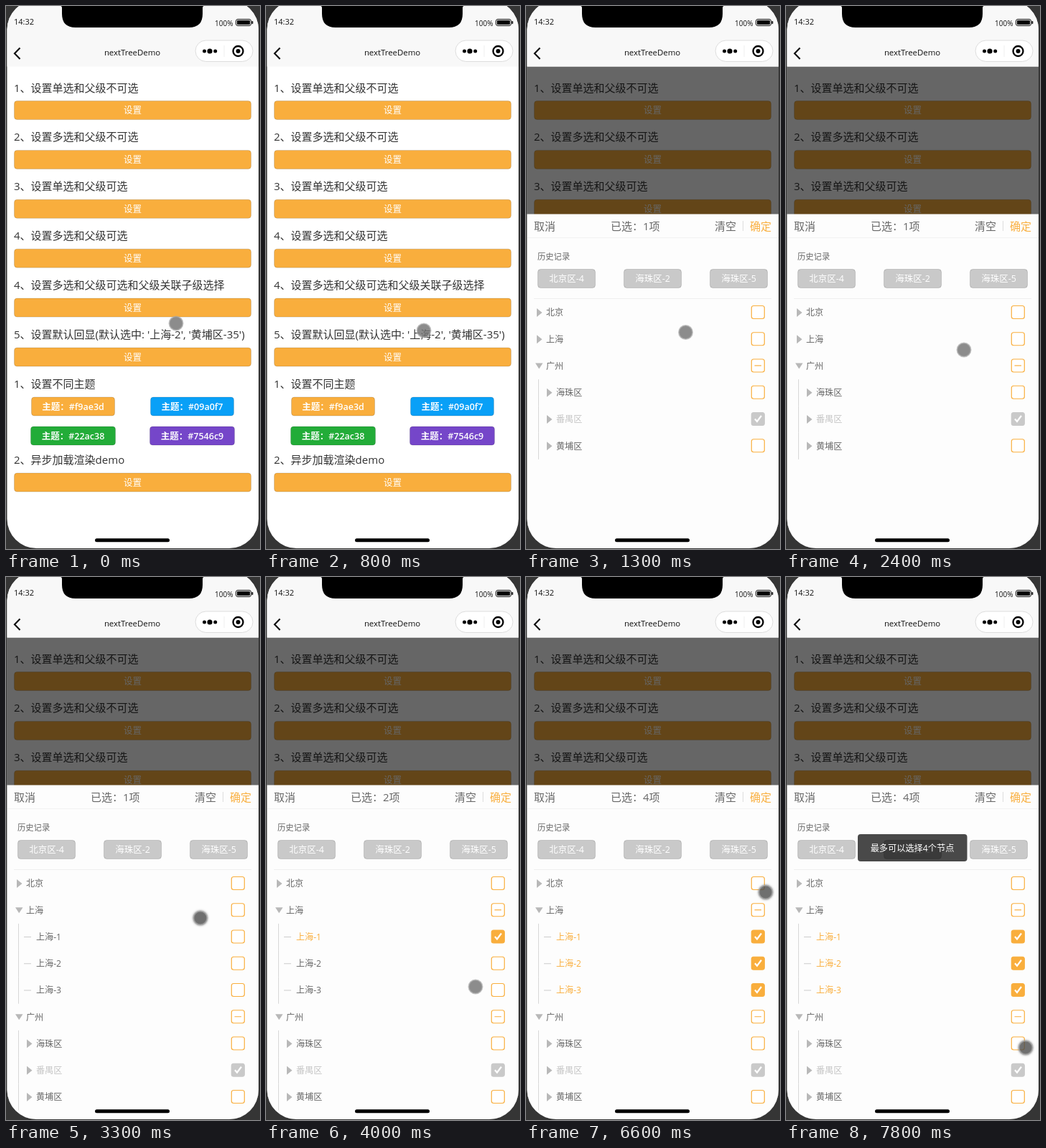
These frames come from a looping animation (354 px wide and 758 px high, 8000 ms). An HTML page:

```html
<!DOCTYPE html>
<html lang="zh-CN">
<head>
<meta charset="utf-8">
<style>
html, body { margin: 0; width: 100%; height: 100%; overflow: hidden; background: #353535; }
svg { display: block; font-family: "Open Sans", "Noto Sans CJK SC", "Noto Sans CJK", sans-serif; }
</style>
</head>
<body>
<svg id="stage" width="354" height="758" viewBox="0 0 354 758">
  <clipPath id="screen"><rect x="1.5" y="-8" width="350.5" height="765" rx="41"/></clipPath>
  <filter id="soft" x="-50%" y="-50%" width="200%" height="200%"><feGaussianBlur stdDeviation="1.6"/></filter>
  <g clip-path="url(#screen)">
    <rect width="354" height="758" fill="#fff"/>
    <g id="page"></g>
    <rect id="mask" y="84.5" width="354" height="674"/>
    <rect width="354" height="84.5" fill="#f8f8f8"/>
    <g id="popup">
      <rect y="290.5" width="354" height="468" fill="#fdfdfd"/>
      <g id="head"></g>
      <g id="tree"></g>
    </g>
    <g id="bar"></g>
  </g>
  <path d="M76 0H276Q274 0 274 3V11Q274 30 255 30H97Q78 30 78 11V3Q78 0 76 0Z"/>
  <rect x="124" y="743.3" width="104" height="5" rx="2.5"/>
  <g id="toast"></g>
  <g id="cursor">
    <circle id="halo" r="10.5" fill="#555" fill-opacity=".6" filter="url(#soft)"/>
    <circle id="disc" r="9.5" stroke="#aaa" stroke-opacity=".65" stroke-width="2"/>
  </g>
</svg>
<script>
const LOOP = 8000, STEP = 100, ORANGE = '#f9ae3d', GREY = '#c9c9c9', INK = '#666';
const el = id => document.getElementById(id);

// y is the vertical middle of the text
const text = (s, x, y, size, fill, anchor = 'start', weight = 400) =>
  `<text x="${x}" y="${y + size * .37}" font-size="${size}" fill="${fill}" text-anchor="${anchor}" font-weight="${weight}">${s}</text>`;
const line = (d, color, width = 1) =>
  `<path d="${d}" fill="none" stroke="${color}" stroke-width="${width}"/>`;
const button = (s, x, y, w, fill, weight = 400) =>
  `<rect x="${x + .5}" y="${y - 13}" width="${w - 1}" height="26" rx="4" fill="${fill}" stroke="#000" stroke-opacity=".14"/>` +
  text(s, x + w / 2, y, 12.5, '#fff', 'middle', weight);

const sections = ['1、设置单选和父级不可选', '2、设置多选和父级不可选', '3、设置单选和父级可选', '4、设置多选和父级可选',
  '4、设置多选和父级可选和父级关联子级选择', "5、设置默认回显(默认选中: '上海-2', '黄埔区-35')"];
const section = (s, y) => text(s, 11, y, 15, '#333') + button('设置', 11, y + 31.5, 331, ORANGE);

el('page').innerHTML = sections.map((s, i) => section(s, 114 + 68.9 * i)).join('') +
  text('1、设置不同主题', 11, 527.5, 15, '#333') +
  [[35, 559, 117, ORANGE], [201, 559, 117, '#09a0f7'], [34, 600, 119, '#22ac38'], [200, 600, 119, '#7546c9']]
    .map(([x, y, w, c]) => button('主题：' + c, x, y, w, c, 600)).join('') +
  section('2、异步加载渲染demo', 633.5);

el('bar').innerHTML = text('14:32', 11, 22, 11, '#111') + text('100%', 291, 24, 10, '#111') +
  '<rect x="320.5" y="18.5" width="21" height="9" rx="2.5" fill="none" stroke="#111"/>' +
  '<rect x="322" y="20" width="18" height="6" rx="1"/><rect x="342.5" y="21" width="1.8" height="4" rx=".8"/>' +
  line('M19.5 58.6L12 66.3L19.5 74', '#111', 2.2) +
  text('nextTreeDemo', 176, 65, 11.4, '#111', 'middle') +
  '<rect x="264" y="48" width="80" height="29.5" rx="14.7" fill="#fff" stroke="#ddd"/>' +
  line('M304 55V71', '#eee') +
  '<circle cx="276.5" cy="63" r="2.5"/><circle cx="284" cy="63" r="3.6"/><circle cx="291.7" cy="63" r="2.5"/>' +
  '<circle cx="323.5" cy="63" r="7" fill="none" stroke="#000" stroke-width="2.3"/><circle cx="323.5" cy="63" r="3"/>';

el('toast').innerHTML = '<rect x="100" y="359" width="152.5" height="38" rx="4" fill-opacity=".71"/>' +
  text('最多可以选择4个节点', 176, 378, 12.2, '#fff', 'middle');

const drawHead = count => text('取消', 11, 307.5, 15, INK) + text(`已选：${count}项`, 118, 307.5, 15, INK) +
  text('清空', 263, 307.5, 15, INK) + line('M302.5 300V314', '#ddd') + text('确定', 312, 307.5, 15, ORANGE, 'start', 500) +
  line('M2 323.5H352', '#f2f2f2') + text('历史记录', 16, 349.7, 11.3, INK) +
  ['北京区-4', '海珠区-2', '海珠区-5'].map((s, i) => button(s, 16 + 120 * i, 380.5, 81, GREY, 500)).join('') +
  line('M11 408.5H342', '#eee');

function checkbox(y, mark) {
  const full = mark === 'on' || mark === 'locked', color = mark === 'locked' ? GREY : ORANGE;
  return `<rect x="314.3" y="${y - 9}" width="18" height="18" rx="3" fill="${full ? color : '#fff'}" stroke="${color}" stroke-width="1.2"/>` +
    (full ? line(`M319 ${y}L322 ${y + 3.5}L328 ${y - 4.5}`, '#fff', 2.2) : '') +
    (mark === 'part' ? line(`M318.5 ${y}H328`, color, 1.2) : '');
}

function row({ name, depth = 0, icon = 'closed', mark }, i) {
  const y = 428 + 37.25 * i, x = 14 * depth;
  const color = { on: ORANGE, locked: '#c4c4c4' }[mark] || INK;
  const icons = {
    closed: `<path d="M${x + 15} ${y - 6}L${x + 22.5} ${y}L${x + 15} ${y + 6}Z" fill="#b8b8b8"/>`,
    open: `<path d="M13 ${y - 4}H23.5L18.2 ${y + 4}Z" fill="#b8b8b8"/>`,
    leaf: line(`M25 ${y}H35`, '#ccc')
  };
  return icons[icon] + text(name, 28 + x, y, 12.1, color) + checkbox(y - .5, mark) +
    (depth ? line(`M17.5 ${y - 18.6}V${y + 18.7}`, '#d8d8d8') : '');
}

const drawTree = (open, picked) => [
  { name: '北京' },
  { name: '上海', icon: open ? 'open' : 'closed', mark: picked && 'part' },
  ...(open ? [1, 2, 3].map(n => ({ name: '上海-' + n, depth: 1, icon: 'leaf', mark: n <= picked && 'on' })) : []),
  { name: '广州', icon: 'open', mark: 'part' },
  { name: '海珠区', depth: 1 },
  { name: '番禺区', depth: 1, mark: 'locked' },
  { name: '黄埔区', depth: 1 }
].map(row).join('');

const path = [[0, 237, 443], [450, 232, 437], [800, 220, 453], [1200, 220, 453], [1800, 235, 468], [2400, 248, 480],
  [2700, 264, 476], [3400, 272, 476], [3700, 312, 510], [3800, 312, 512], [4000, 292, 572], [4150, 294, 570],
  [4350, 313, 548], [4450, 313, 550], [4700, 314, 580], [5000, 314, 575], [5200, 311, 472], [5400, 311, 472],
  [6000, 333, 452], [6500, 334, 440], [6650, 334, 440], [6900, 336, 449], [7100, 336, 449], [7700, 334, 657], [8000, 334, 657]];
const presses = [[1000, 1200], [3300, 3400], [3700, 3800], [4300, 4400], [4700, 4800], [5400, 5500], [6500, 6700], [7700, 8000]];
const picks = [3800, 4400, 4800], toasts = [[5400, 6500], [6800, 8000]];
const within = (spans, t) => spans.some(([a, b]) => t >= a && t < b);

function cursorAt(t) {
  const i = path.findIndex(p => p[0] > t), [t0, x0, y0] = path[i - 1], [t1, x1, y1] = path[i];
  const k = (t - t0) / (t1 - t0);
  return [x0 + (x1 - x0) * k, y0 + (y1 - y0) * k];
}

let drawn = '';
function frame(now) {
  const t = Math.floor(now % LOOP / STEP) * STEP;
  const left = 1 - Math.min(1, Math.max(0, (t - 1000) / 285)), shown = 1 - left * left;
  el('mask').setAttribute('opacity', .6 * shown);
  el('popup').setAttribute('transform', `translate(0 ${467.5 * (1 - shown)})`);

  const open = t >= 3300, picked = picks.filter(p => t >= p).length, key = open + '-' + picked;
  if (key !== drawn) {
    el('head').innerHTML = drawHead(1 + picked);
    el('tree').innerHTML = drawTree(open, picked);
    drawn = key;
  }
  el('toast').style.display = within(toasts, t) ? '' : 'none';

  const pressed = within(presses, t);
  el('cursor').setAttribute('transform', `translate(${cursorAt(t)})`);
  el('halo').style.display = pressed ? '' : 'none';
  el('disc').setAttribute('fill', pressed ? 'rgba(70,70,70,.5)' : 'rgba(115,115,115,.82)');
  requestAnimationFrame(frame);
}
requestAnimationFrame(frame);
</script>
</body>
</html>
```
